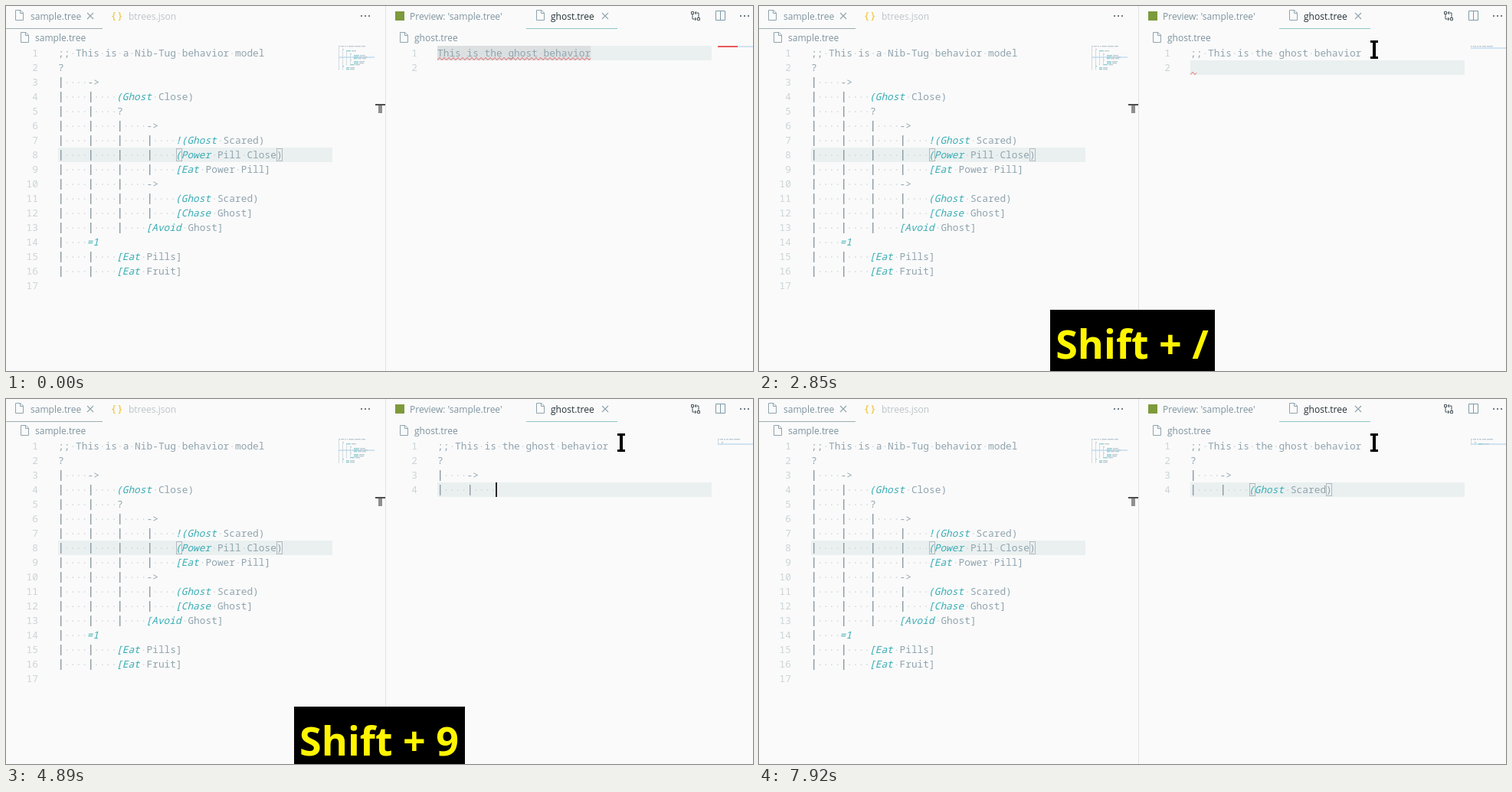
Recreate the animation shown at these times as an HTML page with a canvas. Size 975x477 px, loop 8 s.

```html
<!DOCTYPE html>
<html>
<head>
<meta charset="utf-8">
<style>
html, body { margin: 0; width: 975px; height: 477px; overflow: hidden; background: #fafafa; }
canvas { display: block; }
</style>
</head>
<body>
<canvas id="stage" width="975" height="477"></canvas>
<script>
const ctx = document.getElementById('stage').getContext('2d');
const LOOP = 8000, ROW = 19, CHAR = 7.7, TOP = 52;
const GREY = '#90a4ae', TEAL = '#39adb5', LABEL = '#7e939e', DOT = '#cdd5d9', BAR = '#8c9ba3';
const MONO = '12.83px "Noto Sans Mono", "DejaVu Sans Mono", monospace';
const UI = '12px "Open Sans", "Noto Sans", sans-serif';

const sample = `;; This is a Nib-Tug behavior model
?
|    ->
|    |    (Ghost Close)
|    |    ?
|    |    |    ->
|    |    |    |    !(Ghost Scared)
|    |    |    |    (Power Pill Close)
|    |    |    |    [Eat Power Pill]
|    |    |    ->
|    |    |    |    (Ghost Scared)
|    |    |    |    [Chase Ghost]
|    |    |    [Avoid Ghost]
|    =1
|    |    [Eat Pills]
|    |    [Eat Fruit]
`.split('\n');

const title = 'This is the ghost behavior';
const comment = ';; ' + title;
const head = comment + '\n?\n|    ';
const body = head + '->\n|    |    ';

// Each entry changes part of the right editor's state.
const events = [
  [0, { text: title + '\n', row: 0, sel: true, error: 0, caret: null, banner: '', parens: null, plain: true }],
  [1130, { sel: false, caret: 26 }],
  [1530, { banner: 'Control + /' }],
  [1740, { text: comment + '\n', error: 1, caret: null }],
  [2240, { banner: '' }],
  [2550, { banner: 'Down', row: 1, caret: 0 }],
  [2750, { banner: 'Shift + /', caret: null }],
  [2950, { text: comment + '\n?', error: -1, caret: 1 }],
  [3160, { banner: 'Enter', text: head, row: 2, caret: 5 }],
  [3470, { banner: '' }],
  [3870, { banner: '-', text: head + '-', caret: 6 }],
  [4070, { banner: 'Shift + .', text: head + '->', caret: 7 }],
  [4380, { banner: 'Enter', text: body, row: 3, caret: 10 }],
  [4680, { banner: '' }],
  [4890, { banner: 'Shift + 9' }],
  [4980, { text: body + '()', caret: 11, parens: [10, 11] }],
  [5380, { banner: '' }],
  [5690, { banner: 'Down' }],
  [5900, { banner: 'Down  Enter' }],
  [6000, { text: body + '(Ghost Scared)', caret: 23, parens: [10, 23] }],
  [6300, { plain: false }],
  [6700, { banner: '' }],
  [6910, { banner: 'End', caret: 24 }],
  [7620, { banner: '' }],
  [7920, { caret: null }]
];

function rect(x, y, w, h, color) {
  ctx.fillStyle = color;
  ctx.fillRect(x, y, w, h);
}

function label(text, x, y, color, font = UI, align = 'left') {
  ctx.font = font;
  ctx.fillStyle = color;
  ctx.textAlign = align;
  ctx.fillText(text, x, y);
}

function stroke(d, color, width = 1, x = 0, y = 0) {
  ctx.save();
  ctx.translate(x, y);
  ctx.strokeStyle = color;
  ctx.lineWidth = width;
  ctx.stroke(new Path2D(d));
  ctx.restore();
}

const fileIcon = (x, y) => stroke('M.5 .5H7L10.5 4V13.5H.5ZM6.5 .5V4.5H10.5', GREY, 1, x, y);
const closeIcon = x => stroke('M-4-4L4 4M4-4L-4 4', GREY, 1.1, x, 13);
const more = x => [0, 5, 10].forEach(d => rect(x + d, 12, 2, 2, '#6f7d84'));

// End of the indent and end of the highlighted first token.
function parts(line, plain) {
  const indent = line.match(/^(\|    )*/)[0].length;
  const token = plain ? '' : (line.slice(indent).match(/^(!?[(\[]\w+|=\d)/) || [''])[0];
  return [indent, indent + token.length];
}

function codeLine(line, x, y, plain) {
  const [indent, end] = parts(line, plain);
  [...line].forEach((ch, i) => {
    const left = x + i * CHAR;
    if (ch === ' ') label('·', left, y, DOT, MONO);
    else if (ch === '|') rect(Math.round(left + 3), y - 11, 1.4, 14, BAR);
    else if (i >= indent && i < end) label(ch, left - 1, y, TEAL, 'italic ' + MONO);
    else label(ch, left, y, GREY, MONO);
  });
}

function editor(lines, x, row, opts) {
  rect(x, TOP + row * ROW, 358, ROW, '#eaf0f0');
  if (opts.sel) rect(x, TOP, title.length * CHAR, ROW, '#dce0e1');
  (opts.parens || []).forEach(c => {
    ctx.strokeStyle = '#b4babc';
    ctx.lineWidth = 1;
    ctx.strokeRect(Math.round(x + c * CHAR) + .5, TOP + row * ROW + 1.5, 7, 16);
  });
  lines.forEach((line, i) => {
    const y = TOP + 14 + i * ROW;
    label(i + 1, x - 26, y, '#cbd4d8', MONO, 'right');
    codeLine(line, x, y, opts.plain);
  });
}

function minimap(lines, x, row, plain) {
  rect(x, TOP + row * 2, 47, 2, '#cfe3f3');
  lines.forEach((line, i) => {
    const [indent, end] = parts(line, plain);
    [...line].forEach((ch, c) => {
      if (ch === ' ') return;
      const color = c >= indent && c < end ? '#8fcdd2' : '#bccbd2';
      rect(x + c, TOP + i * 2, 1, 1.3, color);
    });
  });
}

function squiggle(x, y, width) {
  let d = `M${x} ${y + 1.5}`;
  for (let i = 1; i <= width; i++) d += `L${x + i} ${y + 1.5 * Math.cos(i * Math.PI / 3)}`;
  stroke(d, '#e8696a');
}

function chrome() {
  rect(495, 0, 1, 477, '#dfe2e3');
  rect(0, 29, 126, 1, '#9fabb0');
  rect(679, 29, 119, 1, '#8fc6c2');

  fileIcon(12, 5);
  label('sample.tree', 32, 18, LABEL);
  closeIcon(110);
  label('{ }', 138, 17, '#f2c94c', '600 13px "Open Sans", sans-serif');
  label('btrees.json', 160, 18, '#bcc4c8');
  more(463);
  fileIcon(19, 34);
  label('sample.tree', 38, 46, LABEL);

  rect(508, 7, 12, 12, '#7d9a3c');
  label("Preview: 'sample.tree'", 527, 18, LABEL);
  fileIcon(692, 5);
  label('ghost.tree', 711, 18, '#263238');
  closeIcon(782);
  fileIcon(514, 34);
  label('ghost.tree', 533, 46, LABEL);

  stroke('M3 5V11H8M6 9L8 11L6 13M11 9V3H6M8 1L6 3L8 5', '#48545a', 1, 893, 6);
  stroke('M1.5 1.5h3v3h-3zM9.5 9.5h3v3h-3z', '#48545a', 1, 893, 6);
  stroke('M.5 .5H12.5V12.5H.5ZM6.5 .5V12.5', '#7e9aa6', 1, 926, 6);
  more(958);

  rect(482, 128, 13, 2, '#4d4d4d');
  rect(486, 130, 5, 10, '#8f8f8f');
}

function pointer(t) {
  if (t < 520) return;
  const k = Math.min(1, Math.floor((t - 520) / 102) / 5);
  const left = (1 - k) ** 2;
  const x = 803 + 7 * left, y = 57 + 366 * left;
  rect(x - 2, y - 11, 4, 22, '#000');
  rect(x - 5, y - 12, 10, 3, '#000');
  rect(x - 5, y + 9, 10, 3, '#000');
}

function banner(text) {
  if (!text) return;
  const size = text.includes('+') ? 52 : 48;
  const font = `bold ${size}px "Open Sans", "Noto Sans", sans-serif`;
  ctx.font = font;
  const width = Math.round(ctx.measureText(text).width + 15);
  const top = text.includes('/') ? 397 : 402;
  rect(Math.round(487 - width / 2), top, width, 477 - top, '#000');
  label(text, 487, top + 64, '#fff500', font, 'center');
}

function draw(t) {
  const s = Object.assign({}, ...events.filter(e => e[0] <= t).map(e => e[1]));
  const lines = s.text.split('\n');
  rect(0, 0, 975, 477, '#fafafa');
  chrome();
  editor(sample, 68, 7, { parens: [20, 37] });
  minimap(sample, 434, 7);
  editor(lines, 563, s.row, s);
  minimap(lines, 929, s.row, s.plain);

  if (s.error === 0) {
    squiggle(563, 69, 200);
    rect(929, 52, 26, 2, '#e8595c');
  } else if (s.error === 1) {
    squiggle(563, 88, 8);
    if (s.row === 0) rect(929, 54, 46, 2, '#f0a6ab');
  }
  if (s.caret !== null) {
    rect(Math.round(563 + s.caret * CHAR) - 1, TOP + s.row * ROW, 2, ROW, '#272727');
  }
  pointer(t);
  banner(s.banner);
}

function tick() {
  draw(performance.now() % LOOP);
  requestAnimationFrame(tick);
}
tick();
</script>
</body>
</html>
```
